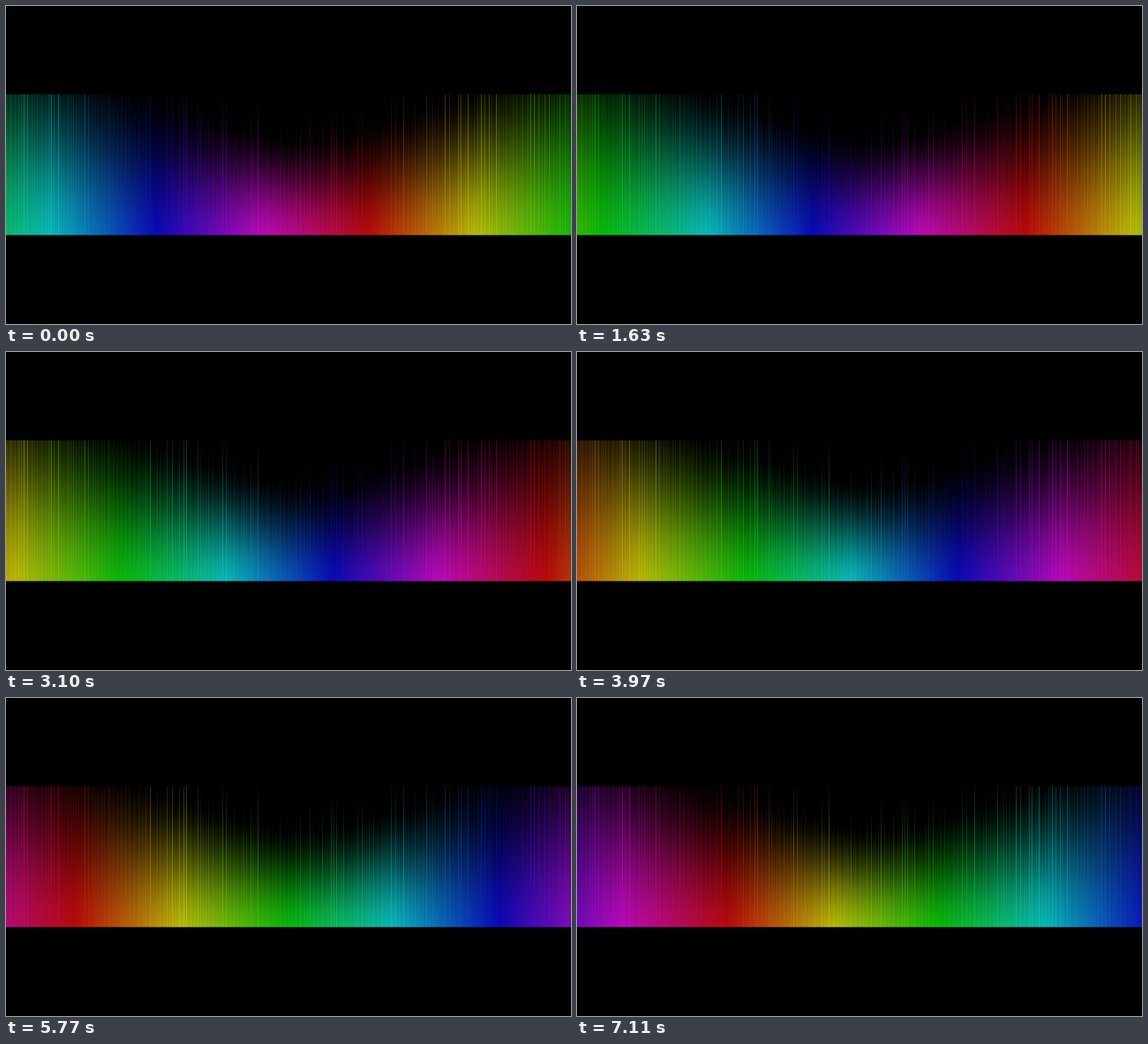
Write an HTML page with a canvas that moves like this. It is 640 px wide and 360 px high and loops after 7170 ms.

```html
<!DOCTYPE html>
<html>
<head>
<meta charset="utf-8">
<style>
  html, body { margin: 0; width: 100%; height: 100%; overflow: hidden; background: #000; }
  canvas { position: absolute; left: 0; top: 100px; }
</style>
</head>
<body>
<canvas id="stage" width="640" height="160"></canvas>
<script>
const W = 640, H = 160, LOOP = 7170, HOLD = 230, STEP = 100 / 3;
const ctx = document.getElementById('stage').getContext('2d');

let seed = 17;
const rand = () => (seed = seed * 16807 % 2147483647) / 2147483647;

// The glow is lowest right of the middle and rises to both sides
const glowHeight = x => 108 + 125 * Math.abs((x - 335) / 335) ** 1.5;

// Linear fade blended with a smoothstep
const fade = v => (v + v * v * (3 - 2 * v)) / 2;

function makeMask() {
  const mask = document.createElement('canvas');
  mask.width = W;
  mask.height = H;
  const m = mask.getContext('2d');
  const img = m.createImageData(W, H);
  let nextStreak = 0;
  for (let x = 0; x < W; x++) {
    let h = glowHeight(x) * (0.94 + 0.1 * rand()), gain = 0.74;
    if (x >= nextStreak) {
      const strength = rand() ** 3;
      h *= 1.06 + 0.45 * strength;
      gain += 0.03 + 0.05 * strength;
      nextStreak = x + 3 + Math.floor(rand() * 3);
    }
    for (let y = 0; y < H; y++) {
      const level = Math.max(0, 1 - (H - 1 - y) / h);
      const dim = y === H - 1 ? 0.4 : 1;
      img.data[(y * W + x) * 4 + 3] = 255 * gain * dim * fade(level);
    }
  }
  m.putImageData(img, 0, 0);
  return mask;
}
const mask = makeMask();

// Half a degree of hue per pixel; cyan sits at x = cyan
function draw(cyan) {
  const start = cyan - 1080;
  const rainbow = ctx.createLinearGradient(start, 0, start + 2160, 0);
  for (let i = 0; i <= 18; i++) rainbow.addColorStop(i / 18, `hsl(${i * 60}, 90%, 50%)`);
  ctx.globalCompositeOperation = 'copy';
  ctx.fillStyle = rainbow;
  ctx.fillRect(0, 0, W, H);
  ctx.globalCompositeOperation = 'destination-in';
  ctx.drawImage(mask, 0, 0);
}

function frame(now) {
  const t = Math.max(0, now % LOOP - HOLD);
  draw(50 + 0.07 * STEP * Math.floor(t / STEP));
  requestAnimationFrame(frame);
}
frame(0);
</script>
</body>
</html>
```
